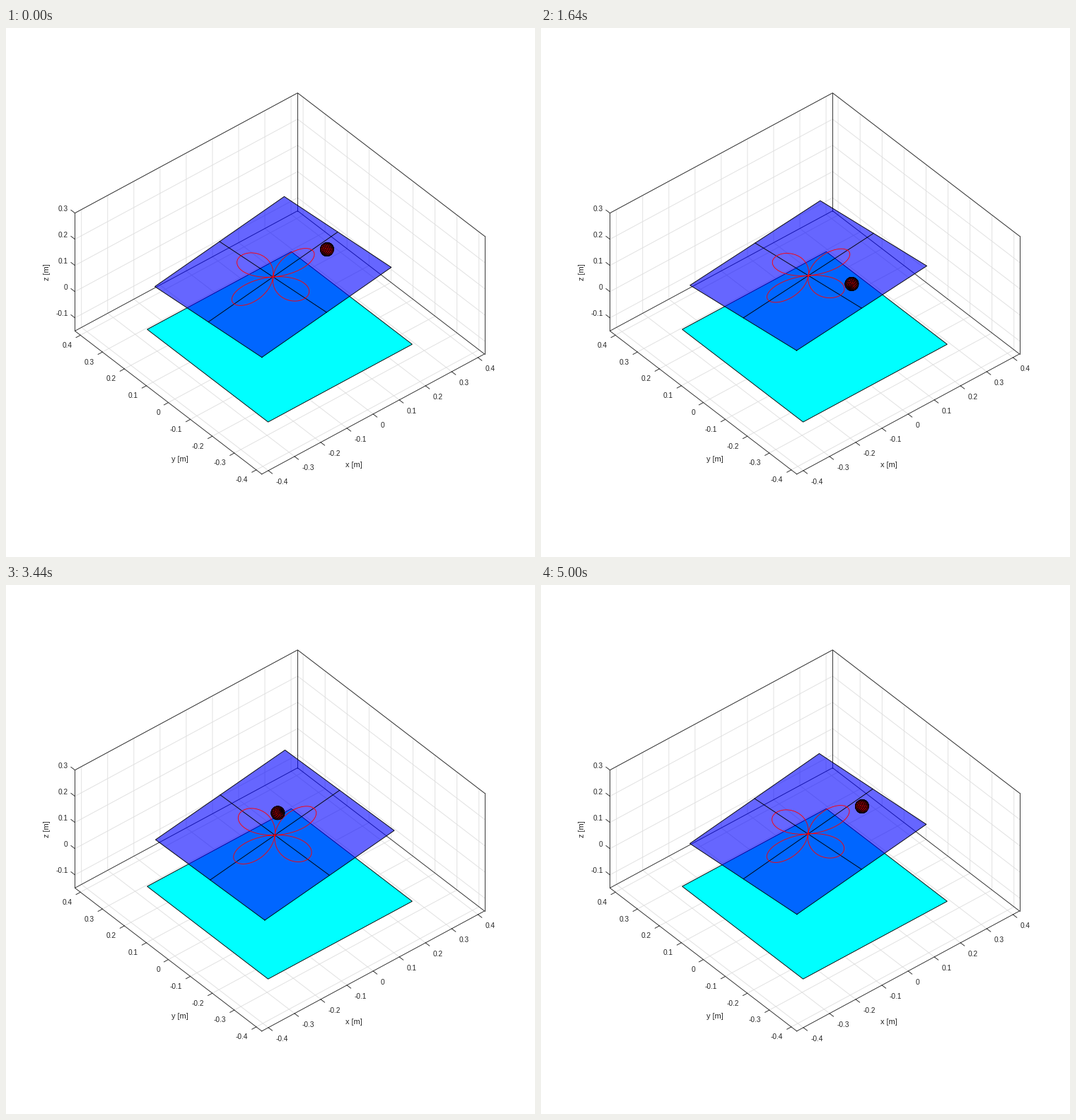
Animation, 748 px wide and 748 px high, one loop 5040 ms. Source, as a matplotlib script:

```python
import numpy as np
import matplotlib.pyplot as plt
from matplotlib.animation import FuncAnimation
from matplotlib.collections import PolyCollection
from matplotlib.patches import Polygon

SIZE, DPI = 748, 93.5
PX = 72 / DPI                      # one pixel in points
FRAMES, STEP_MS, CYCLE = 126, 40, 125

# Orthographic camera, azimuth -40 and elevation 40 degrees
SCALE = 483.6
CA = EA = np.cos(np.radians(40))
SA = SE = np.sin(np.radians(40))
ORIGIN = np.array([386.5, 388.6])
TO_CAMERA = np.array([-SA * EA, -CA * EA, SE])

LIM, Z_LOW, Z_HIGH = 0.425, -0.15, 0.3
PLATE, ARM = 0.25, 0.1033          # half side, distance from the pivot
BASE, BASE_Z = 0.275, -0.1285
ROSE, BALL = 0.15, 0.02

# Steady response to the rose: third harmonic and counter-turning first
POS_3, POS_1 = 0.0794 - 0.0670j, 0.0887 + 0.0122j
TILT_3, TILT_1 = 0.1301 - 0.1120j, 0.0242 + 0.0031j

INK = "#262626"
GRID = "#dfdfdf"
EDGE = 0.9                         # width of the black edges in pixels

fig = plt.figure(figsize=(8, 8), dpi=DPI, facecolor="white")
ax = fig.add_axes([0, 0, 1, 1])
ax.set_xlim(-0.5, SIZE - 0.5)
ax.set_ylim(SIZE - 0.5, -0.5)
ax.axis("off")


def project(points):
    x, y, z = np.moveaxis(np.asarray(points, float), -1, 0)
    u = SCALE * (CA * x - SA * y)
    v = -SCALE * (SE * (SA * x + CA * y) + EA * z)
    return np.stack([u, v], axis=-1) + ORIGIN


def line(points, color, width, z):
    u, v = project(points).T
    return ax.plot(u, v, color=color, lw=width * PX, zorder=z)[0]


def label(u, v, text, size=10.2, **kw):
    ax.text(u, v, text, color=INK, fontsize=size * PX,
            family="Liberation Sans", zorder=3, **kw)


def square(half, z=0.0):
    signs = np.array([(-1, -1), (1, -1), (1, 1), (-1, 1)]) * half
    return np.column_stack([signs, np.full(4, z)])


def tick(point, direction):
    start = project(point)
    step = project(direction) - ORIGIN
    end = start + 7 * step / np.hypot(*step)
    ax.plot(*zip(start, end), color=INK, lw=0.9 * PX, zorder=2)


def draw_axes():
    for k in range(-4, 5):
        t = k / 10
        line([(t, -LIM, Z_LOW), (t, LIM, Z_LOW), (t, LIM, Z_HIGH)], GRID, 0.9, 1)
        line([(-LIM, t, Z_LOW), (LIM, t, Z_LOW), (LIM, t, Z_HIGH)], GRID, 0.9, 1)
        name = f"{t:g}"
        tick((t, -LIM, Z_LOW), (0, -1, 0))
        tick((-LIM, t, Z_LOW), (-1, 0, 0))
        label(529 + 37 * k, 564.6 - 20 * k, name, ha="left")
        label(217.5 - 31.07 * k, 546.6 - 23.8 * k, name, ha="right")
    for k in range(-1, 4):
        t = k / 10
        line([(-LIM, LIM, t), (LIM, LIM, t), (LIM, -LIM, t)], GRID, 0.9, 1)
        tick((-LIM, LIM, t), (0, 1, 0))
        label(87, 369.6 - 37.1 * k, f"{t:g}", ha="right")

    floor = square(LIM, Z_LOW)
    line(np.vstack([floor, floor[:1]]), INK, 0.9, 2)
    roof = square(LIM, Z_HIGH)
    line(roof[1:], INK, 0.9, 2)
    for low, high in zip(floor[1:], roof[1:]):
        line([low, high], INK, 0.9, 2)

    label(491, 620.8, "x [m]", 11, ha="center")
    label(245, 612.8, "y [m]", 11, ha="center")
    label(58, 344.5, "z [m]", 11, ha="center", va="center", rotation=90)


def rot_x(a):
    c, s = np.cos(a), np.sin(a)
    return np.array([(1, 0, 0), (0, c, -s), (0, s, c)])


def rot_y(a):
    c, s = np.cos(a), np.sin(a)
    return np.array([(c, 0, s), (0, 1, 0), (-s, 0, c)])


def sphere_faces(n=20):
    lat = np.linspace(-np.pi / 2, np.pi / 2, n + 1)[:, None]
    lon = np.linspace(-np.pi, np.pi, n + 1)[None, :]
    p = np.stack([np.cos(lat) * np.cos(lon), np.cos(lat) * np.sin(lon),
                  np.sin(lat) + 0 * lon], axis=-1)
    quads = np.stack([p[:-1, :-1], p[:-1, 1:], p[1:, 1:], p[1:, :-1]], axis=2)
    return quads.reshape(-1, 4, 3)


draw_axes()
ax.add_patch(Polygon(project(square(BASE, BASE_Z)), fc="cyan", ec="black",
                     lw=EDGE * PX, zorder=4))

angle = np.linspace(0, 2 * np.pi, 241)
radius = ROSE * np.cos(2 * angle)
rose = np.column_stack([radius * np.cos(angle), radius * np.sin(angle), 0 * angle])
corners = square(PLATE)
outline = np.vstack([corners, corners[:1]])
cross = [np.array([(-PLATE, 0, 0), (PLATE, 0, 0)]),
         np.array([(0, -PLATE, 0), (0, PLATE, 0)])]
faces = sphere_faces()

plate = Polygon(np.zeros((4, 2)), fc=(0, 0, 1, 0.6), ec="none", zorder=5)
ax.add_patch(plate)
curves = [outline, *cross, rose]
curve_lines = [line(c, "black", EDGE, 6) for c in curves[:-1]]
curve_lines.append(line(rose, "red", 0.9, 7))
ball = PolyCollection([], facecolors="red", edgecolors="black",
                      linewidths=0.6 * PX, zorder=8)
ax.add_collection(ball, autolim=False)


def harmonics(third, first, phase):
    z = third * np.exp(3j * phase) + first * np.exp(-1j * phase)
    return z.real, z.imag


def update(i):
    phase = 2 * np.pi * i / CYCLE
    pitch, roll = np.arcsin(harmonics(TILT_3, TILT_1, phase))
    x, y = harmonics(POS_3, POS_1, phase)
    turn = rot_y(-pitch) @ rot_x(roll)

    def on_plate(points):
        return (np.asarray(points) + (0, 0, ARM)) @ turn.T

    plate.set_xy(project(on_plate(corners)))
    for item, pts in zip(curve_lines, curves):
        item.set_data(*project(on_plate(pts)).T)

    # The ball rolls without slipping, so its mesh turns with its place
    spin = turn @ rot_x(-y / BALL) @ rot_y(x / BALL)
    mesh = faces @ spin.T
    front = mesh[(mesh.mean(axis=1) @ TO_CAMERA) > 0]
    ball.set_verts(project(front * BALL + on_plate((x, y, BALL))))
    return [plate, *curve_lines, ball]


anim = FuncAnimation(fig, update, frames=FRAMES, interval=STEP_MS,
                     repeat=True, repeat_delay=0, blit=False)
plt.show()
```
